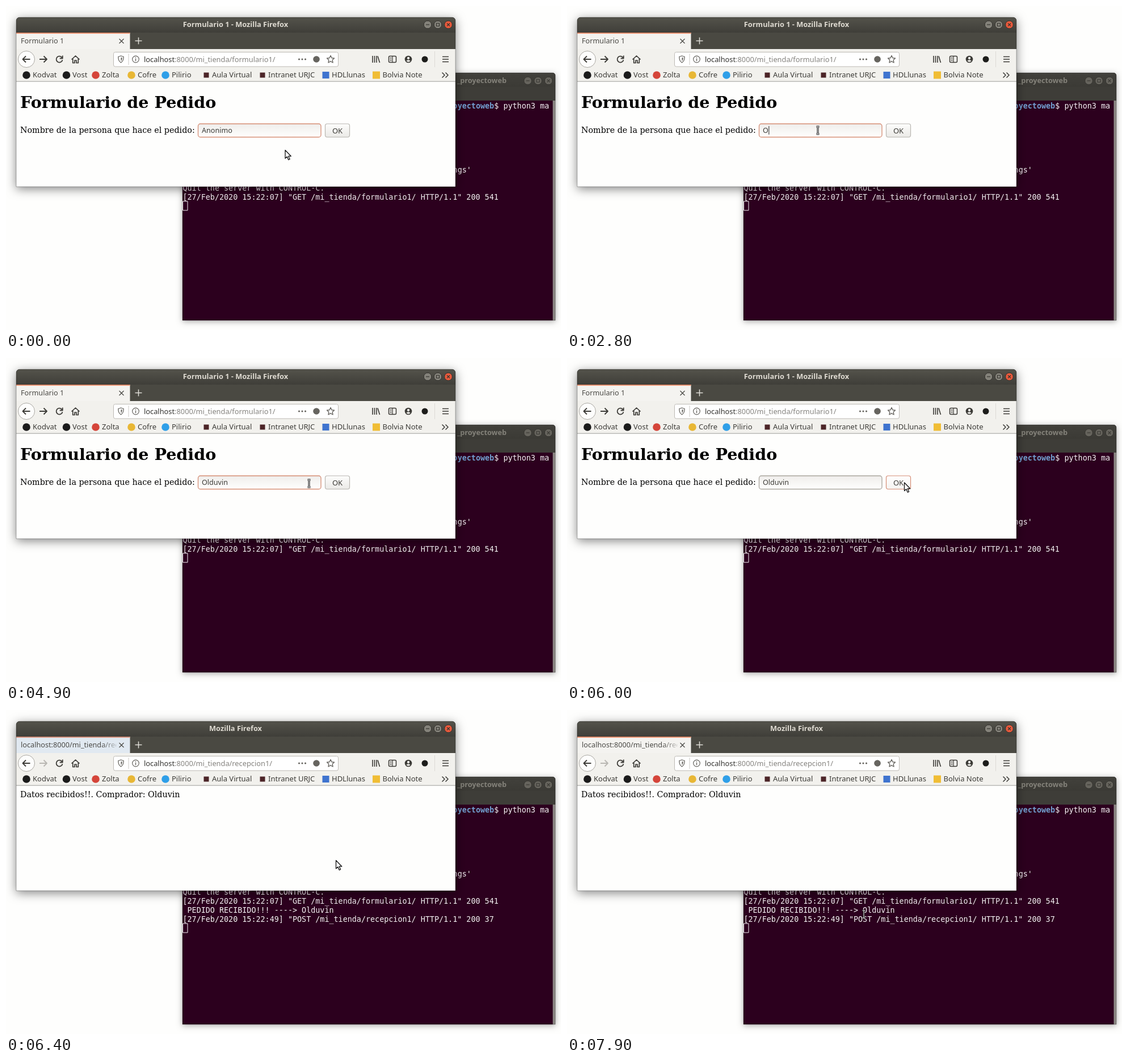
Animation of 978 by 572 pixels, one loop 8 s. Source, as an HTML page with a canvas:

```html
<!DOCTYPE html>
<html lang="es">
<head>
<meta charset="utf-8">
<title>Formulario 1</title>
<style>
html, body { margin: 0; width: 100%; height: 100%; overflow: hidden; background: #fefefd; }
canvas { display: block; }
</style>
</head>
<body>
<canvas id="stage" width="978" height="572"></canvas>
<script>
const ctx = document.getElementById('stage').getContext('2d');
const LOOP = 8000, SENT = 6100;
const SANS = '"Noto Sans", sans-serif';
const SERIF = '"DejaVu Serif", serif';
const MONO = '13.4px "DejaVu Sans Mono", monospace';
const INK = '#3c3b37', ORANGE = '#d68e76', EDGE = 'rgba(0,0,0,0.3)', BUYER = 'Olduvin';
const COL = 8.07, TERM_X = 311.5;

// Pointer steps: time, x, y, shape
const POINTER = [
  [0, 491.5, 254, 'arrow'], [200, 449, 222, 'beam'], [300, 444, 220, 'beam'],
  [700, 443, 219.5, 'beam'], [1000, 442, 219.5, 'beam'], [2900, 441, 216, 'arrow'],
  [4400, 440.5, 217.5, 'arrow'], [4500, 490, 201, 'arrow'], [4600, 540, 186, 'arrow'],
  [4800, 540, 183, 'arrow'], [4900, 534, 221.5, 'beam'], [5100, 568, 224, 'arrow'],
  [5200, 594, 229, 'arrow'], [5500, 594, 219.5, 'arrow'], [6100, 588.5, 224, 'arrow'],
  [6300, 586, 240, 'arrow'], [6400, 581, 265, 'arrow'], [6500, 575, 295, 'arrow'],
  [6600, 569, 327, 'beam'], [6700, 560, 352, 'beam'], [6800, 540, 366, 'beam'],
  [6900, 481, 370.5, 'beam'], [7000, 405, 370, 'beam'], [7100, 347, 361, 'beam'],
  [7200, 334, 343, 'beam'], [7300, 402, 326, 'beam'], [7400, 505, 325, 'beam'],
  [7500, 565, 343, 'beam'], [7600, 552, 361, 'beam'], [7700, 528, 362, 'beam'],
  [7800, 525, 361, 'beam'], [7900, 523, 360.5, 'beam']
];
// Typing steps: time, visible letters
const TYPED = [[2800, 1], [3000, 2], [3200, 3], [3400, 5], [3500, 6], [3600, 7]];

// Name, icon x, text x, color, side of a square icon (0 for a disc)
const BOOKMARKS = [
  ['Kodvat', 36, 47, '#1b1b1b', 0], ['Vost', 106.5, 117, '#1b1b1b', 0],
  ['Zolta', 158, 169, '#d5453a', 0], ['Cofre', 221, 232, '#e8b735', 0],
  ['Pilirio', 281, 292, '#2f9fe8', 0], ['Aula Virtual', 353, 363, '#4c2528', 9],
  ['Intranet URJC', 452, 462, '#4c2528', 9], ['HDLlunas', 563.5, 574, '#3f74cf', 12],
  ['Bolvia Note', 652.5, 663.5, '#f0bd35', 13]
];

const stepAt = (steps, t) => steps.filter(s => s[0] <= t).pop();

function text(str, x, y, font, color = INK, align = 'left') {
  ctx.font = font;
  ctx.fillStyle = color;
  ctx.textAlign = align;
  ctx.fillText(str, x, y);
}
function rect(x, y, w, h, color) {
  ctx.fillStyle = color;
  ctx.fillRect(x, y, w, h);
}
function box(x, y, w, h, r, fill, stroke, width = 1) {
  ctx.beginPath();
  ctx.roundRect(x, y, w, h, r);
  if (fill) { ctx.fillStyle = fill; ctx.fill(); }
  if (stroke) { ctx.strokeStyle = stroke; ctx.lineWidth = width; ctx.stroke(); }
}
function disc(x, y, r, fill, stroke, width = 1) {
  box(x - r, y - r, 2 * r, 2 * r, r, fill, stroke, width);
}
function icon(d, x, y, stroke, width = 1.5, fill) {
  const path = new Path2D(d);
  ctx.save();
  ctx.translate(x, y);
  ctx.lineJoin = 'round';
  if (fill) { ctx.fillStyle = fill; ctx.fill(path); }
  if (stroke) { ctx.strokeStyle = stroke; ctx.lineWidth = width; ctx.stroke(path); }
  ctx.restore();
}
function gradient(y0, y1, ...colors) {
  const g = ctx.createLinearGradient(0, y0, 0, y1);
  colors.forEach((c, i) => g.addColorStop(i / (colors.length - 1), c));
  return g;
}
function shadowed(blur, dy, alpha, draw) {
  ctx.save();
  ctx.shadowColor = `rgba(0,0,0,${alpha})`;
  ctx.shadowBlur = blur;
  ctx.shadowOffsetY = dy;
  draw();
  ctx.restore();
}
function windowButtons(xs, y, fills, ring, mark) {
  const marks = ['M-3 0H3', 'M-2.5 -2.5H2.5V2.5H-2.5Z', 'M-2.5 -2.5L2.5 2.5M2.5 -2.5L-2.5 2.5'];
  xs.forEach((x, i) => {
    disc(x, y, 6.8, fills[i], ring);
    icon(marks[i], x, y, mark, 1.2);
  });
}

function terminalLine(str, row, col = 0, color = '#f4f2f3', bold = '') {
  text(str, TERM_X + col * COL, 181 + row * 16.1, bold + MONO, color);
}
function terminal(sent) {
  shadowed(11, 2, 0.34, () => box(311, 118, 657, 437, [5, 5, 0, 0], '#3d3c37'));
  box(311, 118, 657, 26, [5, 5, 0, 0], gradient(118, 144, '#42413c', '#3b3a35'));
  rect(311, 143, 657, 24, '#3e3d38');
  text('_proyectoweb', 882, 136.3, 'bold 12.7px ' + SANS, '#84827a', 'right');
  const gray = '#66645d';
  windowButtons([919.5, 937.5, 956], 132, [gray, gray, gray], '#35342f', '#3b3a35');
  rect(311, 167, 653, 388, '#2c001e');
  rect(963.5, 167, 4.5, 388, '#8b8783');
  box(311, 118, 657, 437, [5, 5, 0, 0], null, EDGE);

  terminalLine('royectoweb', 0, 58, '#729fcf', 'bold ');
  terminalLine('$ python3 ma', 0, 68);
  terminalLine("ings'", 7, 58);
  terminalLine('Quit the server with CONTROL-C.', 9);
  terminalLine('[27/Feb/2020 15:22:07] "GET /mi_tienda/formulario1/ HTTP/1.1" 200 541', 10);
  if (sent) {
    terminalLine(' PEDIDO RECIBIDO!!! ----> ' + BUYER, 11);
    terminalLine('[27/Feb/2020 15:22:49] "POST /mi_tienda/recepcion1/ HTTP/1.1" 200 37', 12);
  }
  box(311.5, sent ? 377 : 344.8, 8.5, 16, 0, null, '#f4f2f3', 1);
}

function tab(t, sent) {
  rect(18, 47, 200.5, 29, '#f4f3f0');
  rect(18, 47, 200.5, 1.8, '#e88a66');
  const age = t - SENT;
  if (age >= 0 && age < 400) {
    const step = Math.floor(age / 100);
    ctx.globalAlpha = 0.62 - step * 0.17;
    rect(18, 47, Math.min(200.5, 57 + step * 75), 29, '#4d9df0');
    ctx.globalAlpha = 1;
  }
  let color = '#4a4945';
  if (sent) {
    color = ctx.createLinearGradient(168, 0, 202, 0);
    color.addColorStop(0, '#4a4945');
    color.addColorStop(1, 'rgba(74,73,69,0)');
  }
  ctx.save();
  ctx.beginPath();
  ctx.rect(18, 47, 176, 29);
  ctx.clip();
  text(sent ? 'localhost:8000/mi_tienda/recepcion1/' : 'Formulario 1', 26, 66, '12.7px ' + SANS, color);
  ctx.restore();
  icon('M-4 -4L4 4M4 -4L-4 4', 203.5, 62, '#4a4945', 1.3);
  icon('M-6 0H6M0 -6V6', 233.5, 61.5, '#e0ded8', 1.5);
}

function toolbar(sent) {
  const arrow = 'M-6.5 0H6.5M1 -5.5L6.5 0L1 5.5';
  disc(36, 94, 14.5, '#fdfdfc', '#a9a7a2');
  icon('M6.5 0H-6.5M-1 -5.5L-6.5 0L-1 5.5', 36, 94, INK, 1.8);
  icon(arrow, 65.5, 94, sent ? '#b9b7b2' : INK, 1.8);
  icon('M4.8 -2.8A5.5 5.5 0 1 0 5.5 1.2M5.7 -6.5V-1.5H0.7', 94, 94, INK, 1.8);
  icon('M-7 0.5L0 -6L7 0.5M-4.8 -1V6.5H-1.5V2H1.5V6.5H4.8V-1', 122.5, 94, INK, 1.7);

  box(189.5, 81.5, 396, 25.5, 3, '#fff', '#bdbab5');
  icon('M0 -6Q2.8 -4.6 4.6 -4.6Q5 2.8 0 6Q-5 2.8 -4.6 -4.6Q-2.8 -4.6 0 -6Z', 202.5, 94, '#66645f', 1.3);
  icon('M0 -3.3Q1.8 -2.8 2.3 -2.8Q2.3 1.4 0 3.5Z', 202.5, 94, null, 0, '#66645f');
  rect(215.5, 84, 1, 20, '#cbc9c5');
  disc(228.5, 94, 5.8, null, '#66645f', 1.2);
  icon('M0 -1V3.2M0 -3.4V-2', 228.5, 94, '#66645f', 1.4);
  const urlFont = '12.8px ' + SANS;
  text('localhost', 243, 98.8, urlFont, '#33322f');
  const hostWidth = ctx.measureText('localhost').width;
  text(':8000/mi_tienda/' + (sent ? 'recepcion1/' : 'formulario1/'), 243 + hostWidth, 98.8, urlFont, '#85837f');
  [516.5, 522, 527.5].forEach(x => disc(x, 94, 1.6, '#66645f'));
  disc(547, 94, 5.8, '#66645f');
  icon('M0 -6.5L2 -2.3L6.5 -1.8L3.2 1.3L4 6L0 3.7L-4 6L-3.2 1.3L-6.5 -1.8L-2 -2.3Z', 572, 94, '#66645f', 1.4);

  icon('M-6 -6V6M-2.5 -6V6M1 -6V6M3 -5.5L6.5 6', 652, 94, INK, 1.6);
  box(674.5, 88.5, 13, 11, 2, null, INK, 1.5);
  icon('M0 -5.5V5.5M-4.5 -2.5H-1.5M-4.5 0H-1.5M-4.5 2.5H-1.5', 681, 94, INK, 1.2);
  disc(709, 94, 6.3, INK);
  disc(709, 92, 2.2, '#f2f1ed');
  icon('M-3.7 3Q0 -0.5 3.7 3Q0 6.5 -3.7 3Z', 709, 94, null, 0, '#f2f1ed');
  disc(738, 94, 5.5, '#1d1d1b');
  rect(755, 80, 1, 28, '#dcdad6');
  icon('M-5.5 -4.5H5.5M-5.5 0H5.5M-5.5 4.5H5.5', 774.5, 94, INK, 1.6);

  for (const [name, ix, tx, color, side] of BOOKMARKS) {
    if (side) rect(ix - side / 2, 122 - side / 2, side, side, color);
    else disc(ix, 122, 6.8, color);
    text(name, tx, 126.3, '13px ' + SANS);
  }
  icon('M-5.5 -4.5L-1 0L-5.5 4.5M0.5 -4.5L5 0L0.5 4.5', 774, 122, INK, 1.5);
}

function form(t) {
  text('Formulario de Pedido', 25, 180, 'bold 28.6px ' + SERIF, '#000');
  text('Nombre de la persona que hace el pedido:', 25, 224.3, '14.3px ' + SERIF, '#000');
  const pressed = t >= 6000;
  box(338.5, 208, 216.5, 23.5, 4, gradient(208, 231, '#efedeb', '#f7f6f4', '#fefefd'), pressed ? '#aaa69f' : ORANGE, 1.3);

  const typed = stepAt(TYPED, t);
  const value = typed ? BUYER.slice(0, typed[1]) : 'Anonimo';
  const font = '12.6px ' + SANS;
  const selected = t >= 1300 && !typed;
  ctx.font = font;
  const width = ctx.measureText(value).width;
  if (selected) rect(345, 211, width, 17, '#f07746');
  text(value, 345, 224.3, font, selected ? '#fff' : INK);
  if ((t >= 700 && t < 1300) || (t >= 2800 && t < 4400)) rect(345.5 + width, 212, 1, 15, '#222');

  const hover = t >= 5100;
  box(562.5, 208, 43, 23.5, 3.5, gradient(208, 231, hover ? '#fff' : '#fdfdfc', pressed ? '#f5f3f1' : '#ebeae7'),
    pressed ? ORANGE : '#b9b6b1', 1.2);
  text('OK', 584, 224.5, '13px ' + SANS, INK, 'center');

  if (t >= 2900 && t < 4800) {
    shadowed(4, 1, 0.25, () => rect(338, 232, 218, 21.5, '#fff'));
    box(338, 232.5, 217.5, 20.5, 0, '#fff', '#bcbab7');
    text(BUYER, 344, 247.8, font);
  }
}

function browser(t, sent) {
  shadowed(18, 4, 0.48, () => box(18, 20, 774, 299, [6, 6, 0, 0], '#45443e'));
  box(18, 20, 774, 28, [6, 6, 0, 0], gradient(20, 47, '#54534b', '#3f3e39'));
  rect(18, 47, 774, 29, '#4a4942');
  text((sent ? '' : 'Formulario 1 - ') + 'Mozilla Firefox', 404.5, 37, 'bold 12.8px ' + SANS, '#dfdbd2', 'center');
  windowButtons([743, 761, 779.5], 33, ['#84827a', '#84827a', '#ea5a3c'], '#34332f', '#35342f');
  rect(18, 76, 774, 57, '#f2f1ed');
  tab(t, sent);
  toolbar(sent);
  rect(18, 132.5, 774, 1, '#b9b7b3');
  rect(18, 133.5, 774, 185.5, '#fefefd');
  box(18, 20, 774, 299, [6, 6, 0, 0], null, EDGE);
  if (sent) text('Datos recibidos!!. Comprador: ' + BUYER, 25, 153.8, '14.3px ' + SERIF, '#000');
  else form(t);
}

function pointer(t) {
  const [, x, y, shape] = stepAt(POINTER, t);
  if (shape === 'arrow') {
    icon('M0.5 0.5V15L3.8 12L6.2 17.6L8.6 16.5L6.2 11.2H10.8Z', x, y, '#111', 1.3, '#fff');
  } else {
    const beam = 'M-2.5 -6.5H2.5M0 -6.5V6.5M-2.5 6.5H2.5';
    icon(beam, x, y, '#111', 3);
    icon(beam, x, y, '#fff', 1);
  }
}

function frame() {
  const t = performance.now() % LOOP, sent = t >= SENT;
  rect(0, 0, 978, 572, '#fefefd');
  terminal(sent);
  browser(t, sent);
  pointer(t);
  requestAnimationFrame(frame);
}
frame();
</script>
</body>
</html>
```
